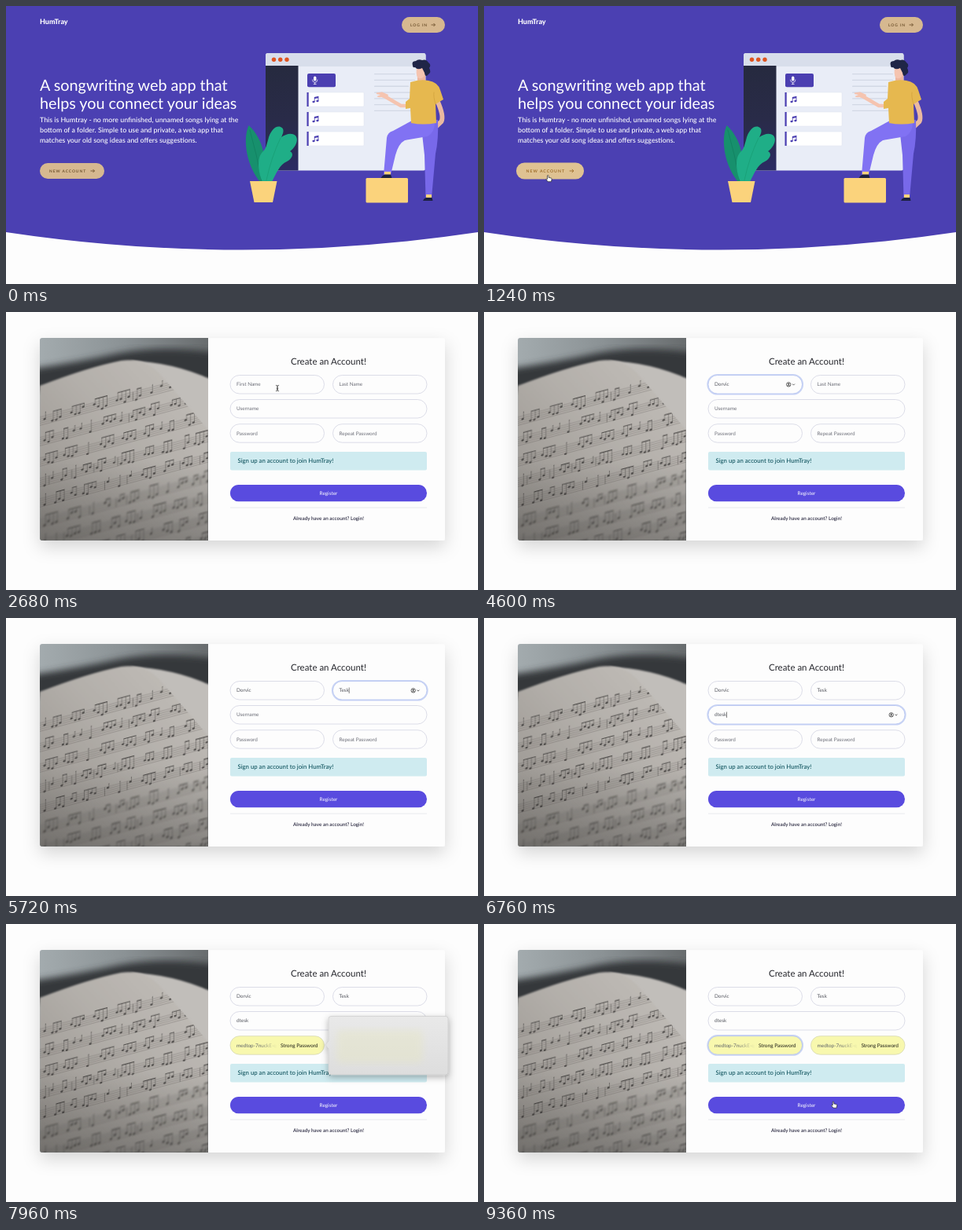
These frames come from a looping animation (600 px wide and 354 px high, 9400 ms). An HTML page:

```html
<!DOCTYPE html>
<html lang="en">
<head>
<meta charset="utf-8">
<title>Songwriting app sign-up</title>
<style>
  html, body { margin: 0; width: 100%; height: 100%; overflow: hidden; background: #fdfdfd; }
  svg { display: block; width: 100vw; height: 100vh; font-family: Lato, "Open Sans", sans-serif; text-rendering: geometricPrecision; }
</style>
</head>
<body>
<svg id="stage" viewBox="0 0 600 354"></svg>
<script>
const LOOP = 9400;
const PAGE_SWITCH = 2080;
const stage = document.getElementById('stage');
const $ = id => document.getElementById(id);

const clamp = v => Math.max(0, Math.min(1, v));
const ease = v => { v = clamp(v); return v * v * (3 - 2 * v); };
const mix = (a, b, k) => a + (b - a) * k;
const mixRgb = (a, b, k) => `rgb(${a.map((v, i) => Math.round(mix(v, b[i], k)))})`;
const show = (el, on) => el.setAttribute('display', on ? 'inline' : 'none');

const text = (x, y, size, str, extra = '') =>
  `<text x="${x}" y="${y}" font-size="${size}" ${extra}>${str}</text>`;
const rect = (x, y, w, h, fill, r = 0, extra = '') =>
  `<rect x="${x}" y="${y}" width="${w}" height="${h}" rx="${r}" fill="${fill}" ${extra}/>`;
const path = (d, fill, extra = '') => `<path d="${d}" fill="${fill}" ${extra}/>`;
const line = (d, stroke, width, extra = '') =>
  `<path d="${d}" fill="none" stroke="${stroke}" stroke-width="${width}" stroke-linecap="round" stroke-linejoin="round" ${extra}/>`;
const arrow = (x, y) =>
  `<path d="M${x - 2.5} ${y}h5m-2 -2l2 2l-2 2" fill="none" stroke="currentColor" stroke-width=".9"/>`;

// Seeded generator for the sheet music
let seed = 7;
const rand = () => (seed = (seed * 16807) % 2147483647) / 2147483647;

/* ---------- landing page ---------- */
function pill(id, x, y, w, h, label, labelX, arrowX) {
  return `<g id="${id}" color="#70542f">` + rect(x, y, w, h, '#d6b890', h / 2) +
    text(labelX, y + h / 2 + 1.8, 4.9, label, 'font-weight="700" letter-spacing=".95" fill="currentColor"') +
    arrow(arrowX, y + h / 2) + '</g>';
}

function songCard(y) {
  return rect(383, y, 72, 18, '#fff', 1, 'stroke="#dde2ee" stroke-width=".5"') +
    rect(382.5, y, 2.2, 18, '#4b3fb1') +
    `<g transform="translate(393 ${y + 9})" fill="#4b3fb1">` +
    '<ellipse cx="-2" cy="3" rx="1.6" ry="1.3"/><ellipse cx="2.9" cy="2" rx="1.6" ry="1.3"/>' +
    '<path d="M-1.2 3V-3L4.4 -4.2V2H3.5V-1.8L-.4 -1V3z"/></g>';
}

function browserArt() {
  let s = rect(330, 60, 203.5, 149.5, '#e9edf7', 3);
  s += path('M330 77V63q0 -3 3 -3h197.5q3 0 3 3V77z', '#d8deeb');
  for (const x of [340.5, 348.7, 357]) s += `<circle cx="${x}" cy="68.3" r="2.7" fill="#df5420"/>`;
  s += rect(330, 76, 41.5, 133.5, 'url(#side)');
  s += rect(383, 86, 36, 17.3, '#4b3fb1', 2);
  s += rect(391, 89.5, 3.4, 6, '#fff', 1.7) + line('M389.5 94q0 3.4 3.2 3.4t3.2 -3.4M392.7 97.5v2m-1.5 0h3', '#fff', .7);
  s += [110, 135, 160].map(songCard).join('');
  for (let i = 0; i < 7; i++) s += rect(468, 86 + i * 7.8, i % 3 === 2 ? 44 : 52, 1.3, '#d2d8e5', .6);
  return s;
}

function plantArt() {
  return path('M308.5 152C300 172 307 205 323 224L329 224C331 196 328 170 308.5 152z', '#17906d') +
    line('M310 158Q319 190 325 222', '#107a5b', .6) +
    path('M326 224C319 207 320 192 326 186C331 181 331 177 333 171C336 158 343 152 349 154C355 156 352 163 350 167C356 163 363 161 368 165C373 171 367 181 361 185C367 188 363 195 357 198C348 202 344 212 338 224z', '#1fae87') +
    line('M331 222Q337 193 349 168', '#17996f', .6) +
    path('M310 223H344.5L339 250H315.5z', '#fbd37c');
}

function personArt() {
  const skin = '#f5c4b0';
  return rect(457.5, 219, 53.5, 31.5, '#fbd37c', 1.5) +
    line('M548 120Q557 140 553.5 147L543 157', '#eab9a0', 6) +
    path('M527 145L549 145Q550 170 546 188L541 244H533.5L532 190z', '#7869ea') +
    path('M516 146H545Q546 160 536 166L507 171Q499 175 495 190L489 215H480L484 168Q485 161 492 159z', '#8172f3') +
    path('M534 240H541V244H534z', '#fbd37c') + path('M530 248Q531 245 534 244H541.5L542.5 248z', '#1c2140') +
    path('M481 211H489V215H481z', '#fbd37c') + path('M476.5 219Q478 216 481 214.5H489L490.5 219z', '#1c2140') +
    line('M515 127L502 127L483 116', skin, 4.6) +
    path('M486 113L478 109.5L471 110.5Q470 112 473 112.5L476 113L471.5 115Q473 117 477 116L484 118.5z', skin) +
    path('M523 84H533V97Q528 102 523 97z', '#eeb59f') +
    path('M514 97Q526 93 537 95Q549 97 552 107L556 119L546 125L547 149Q530 152 515 149L514 130L508 131L508 122L513 118z', '#e6b84f') +
    line('M546 125Q543 115 544 110', '#cf9f3b', .7) +
    path('M522 79Q521 87 523 91Q527 94 531 90L535 81L529 75z', skin) +
    path('M517 76Q515 70 521 70Q524 67 529 69Q534 67 537 72Q541 75 538 79Q541 84 537 87Q533 92 532 85Q530 81 529 79Q523 82 520 78Q517 79 517 76z', '#1f2547');
}

const landing = () => `<g id="landing">` +
  path('M0 0H600V288Q300 333 0 288z', '#4b40b2') +
  text(43, 23, 9, 'HumTray', 'fill="#fff" font-weight="800"') +
  pill('login', 503, 14, 55, 20, 'LOG IN', 514, 543) +
  `<g fill="#fff">` +
  text(43, 108.3, 19.8, 'A songwriting web app that') + text(43, 130.8, 19.8, 'helps you connect your ideas') +
  `<g font-weight="500">` +
  text(43, 148.2, 8.8, 'This is Humtray - no more unfinished, unnamed songs lying at the') +
  text(43, 160.9, 8.8, 'bottom of a folder. Simple to use and private, a web app that') +
  text(43, 173.5, 8.8, 'matches your old song ideas and offers suggestions.') + '</g></g>' +
  pill('join', 43, 200, 82, 20, 'NEW ACCOUNT', 55, 110) +
  browserArt() + plantArt() + personArt() + '</g>';

/* ---------- sign-up page ---------- */
function stave(y, blur) {
  let lines = '', heads = '', stems = '', beams = '';
  for (let k = 0; k < 5; k++) lines += `M0 ${k * 2.6}H220`;
  for (let x = 6; x < 215;) {
    const count = 1 + Math.floor(rand() * 4), top = -2 - rand() * 3, from = x;
    for (let k = 0; k < count; k++, x += 5) {
      const ny = 1 + rand() * 10;
      heads += `<ellipse cx="${x.toFixed(1)}" cy="${ny.toFixed(1)}" rx="1.6" ry="1.2"/>`;
      stems += `M${(x + 1.3).toFixed(1)} ${ny.toFixed(1)}V${top.toFixed(1)}`;
    }
    beams += `M${from + 1.3} ${top}H${x - 3.7}`;
    x += 3 + rand() * 9;
    if (rand() < .3) stems += `M${x - 4} 0V10.4`;
  }
  return `<g transform="translate(43 ${y}) skewY(-15)" opacity=".75" filter="url(#${blur})">` +
    line(lines, '#5c5854', .4) + line(stems, '#33302f', .5) + line(beams, '#2b2928', 1.1) +
    `<g fill="#2b2928">${heads}</g></g>`;
}

function photo() {
  const page = 'M43 94Q105 70 146 62Q176 58 195 78L257 150V291H43z';
  let s = '<clipPath id="frame"><path d="M257 33V291H46q-3 0 -3 -3V36q0 -3 3 -3z"/></clipPath>' +
    `<clipPath id="sheet"><path d="${page}"/></clipPath><g clip-path="url(#frame)">` +
    rect(43, 33, 214, 258, 'url(#wall)') +
    path('M35 72Q90 64 145 52Q200 42 270 52V100H35z', '#35383a', 'filter="url(#soft)"') +
    path('M158 62Q215 64 265 88V170L190 78z', '#c1beba', 'filter="url(#hazy)"') +
    path(page, 'url(#paper)', 'filter="url(#hazy)"') + '<g clip-path="url(#sheet)">';
  for (let i = 0; i < 9; i++) s += stave(134 + i * 26, i < 5 ? 'sharp' : 'hazy');
  return s + '</g>' + rect(43, 33, 214, 258, 'url(#dim)') + '</g>';
}

const fields = [
  { x: 285, y: 80.5, w: 119.5, hint: 'First Name', value: 'Dorvic', focus: [[3040, 4840]], start: 3250, step: 150 },
  { x: 415.5, y: 80.5, w: 119.5, hint: 'Last Name', value: 'Tesk', focus: [[4840, 5760]], start: 5080, step: 130 },
  { x: 285, y: 111.5, w: 250, hint: 'Username', value: 'dtesk', focus: [[5760, 6840]], start: 6080, step: 130 },
  { x: 285, y: 142.7, w: 119.5, hint: 'Password', value: '', focus: [[6840, 7080], [8120, LOOP]], filled: 7120 },
  { x: 415.5, y: 142.7, w: 119.5, hint: 'Repeat Password', value: '', focus: [], filled: 7120 }
];

function fieldSvg(f, i) {
  const { x, y, w } = f, ix = x + w - 17.3, cy = y + 11.8;
  let s = rect(x, y, w, 23.5, 'none', 11.75, `id="ring${i}" stroke="#c9d4f5" stroke-width="3.2"`) +
    rect(x, y, w, 23.5, '#fdfdfd', 11.75, `id="box${i}" stroke="#d3d5e2" stroke-width=".8"`) +
    text(x + 8, y + 13.9, 6.4, f.hint, `id="txt${i}"`) +
    `<path id="caret${i}" stroke="#333" stroke-width=".6"/>` +
    `<g id="icon${i}" fill="none" stroke="#222" stroke-width=".7"><circle cx="${ix}" cy="${cy}" r="2.7"/>` +
    `<circle cx="${ix}" cy="${cy - .7}" r=".7" fill="#222"/><path d="M${ix - 1.6} ${cy + 1.7}q1.6 -1.6 3.2 0M${ix + 4.8} ${cy - .7}l1.5 1.5l1.5 -1.5"/></g>`;
  if (f.filled) {
    s += `<g id="auto${i}">` +
      `<linearGradient id="fade${i}" gradientUnits="userSpaceOnUse" x1="${x + 36}" x2="${x + 60}">` +
      '<stop stop-color="#5c6066"/><stop offset="1" stop-color="#5c6066" stop-opacity="0"/></linearGradient>' +
      text(x + 8, y + 13.9, 6.4, 'medtop-7nuckE-q', `fill="url(#fade${i})"`) +
      text(x + w - 8, y + 13.9, 6.5, 'Strong Password', 'fill="#1b1b14" text-anchor="end"') + '</g>';
  }
  return s;
}

const signup = () => `<g id="signup">` +
  rect(43, 33.5, 515, 257.5, '#fdfdfd', 3, 'filter="url(#lift)"') + photo() +
  text(410, 66.5, 11.5, 'Create an Account!', 'text-anchor="middle" fill="#25262c"') +
  fields.map(fieldSvg).join('') +
  rect(285, 178, 250, 23.5, '#cfebf0', 2) +
  text(294.5, 192.2, 7.75, 'Sign up an account to join HumTray!', 'fill="#0f535d" font-weight="500"') +
  rect(285, 220, 250, 21.3, '#594bdf', 10.6) +
  text(410, 232.6, 6.4, 'Register', 'text-anchor="middle" fill="#fff"') +
  rect(285, 248.7, 250, .7, '#dfe0e6') +
  text(410, 265.1, 6.4, 'Already have an account? Login!', 'text-anchor="middle" fill="#1c1b34" font-weight="500"') +
  `<g id="popup">` +
  path('M413 117.5H559q3 0 3 3V189q0 3 -3 3H413q-3 0 -3 -3V159l-4.5 -5l4.5 -5V120.5q0 -3 3 -3z', 'url(#pane)', 'stroke="#bcbcbc" stroke-width=".5" filter="url(#popLift)"') +
  rect(420, 135, 110, 42, '#e6e6c0', 6, 'opacity=".4" filter="url(#soft)"') + '</g></g>';

const stops = list => list.map(([o, c, a = 1]) => `<stop offset="${o}" stop-color="${c}" stop-opacity="${a}"/>`).join('');
const grad = (id, dir, ...list) => `<linearGradient id="${id}" ${dir}>${stops(list)}</linearGradient>`;
const blur = (id, size) => `<filter id="${id}"><feGaussianBlur stdDeviation="${size}"/></filter>`;
const shadow = (id, dy, size, alpha) =>
  `<filter id="${id}" x="-20%" y="-30%" width="140%" height="170%"><feDropShadow dx="0" dy="${dy}" stdDeviation="${size}" flood-opacity="${alpha}"/></filter>`;
const down = 'x1="0" y1="0" x2="0" y2="1"';
const across = 'x1="0" y1="0" x2="1" y2="0"';
const diag = 'x1="1" y1="0" x2="0" y2="1"';

const cursors =
  `<g id="cursor"><g id="hand">` +
  path('M-2 -3.6q.9 -1 1.6 .2v2.3l3 .6q1.2 .3 1 1.5l-.6 3.2h-4.2l-2.4 -3q.1 -1.2 1.6 -.2z', '#fff', 'stroke="#222" stroke-width=".7"') +
  '</g><g id="beam">' + line('M-1.7 -3.7q1.7 0 1.7 1v5.4q0 1 -1.7 1M1.7 -3.7q-1.7 0 -1.7 1v5.4q0 1 1.7 1M-.8 .9h1.6', '#333', .7) +
  '</g><g id="pointer">' + path('M-2 -4V4L0 2.3L1.3 5L2.5 4.5L1.3 1.8H3.7z', '#222', 'stroke="#fff" stroke-width=".6"') + '</g></g>';

stage.innerHTML = '<defs>' +
  grad('side', down, [0, '#262a3f'], [.5, '#292b48'], [1, '#2b2b63']) +
  grad('wall', across, [0, '#a3abae'], [.5, '#8b9295'], [1, '#686c6e']) +
  grad('paper', diag, [0, '#c4c0bb'], [.45, '#b3afaa'], [1, '#94908b']) +
  grad('dim', down, [0, '#222', 0], [.6, '#222', 0], [1, '#222', .3]) +
  grad('pane', down, [0, '#e9e9e9'], [1, '#dddddd']) +
  shadow('lift', 8, 11, .16) + shadow('popLift', 3, 4, .3) +
  blur('soft', 4) + blur('hazy', 1.2) + blur('sharp', .35) + '</defs>' +
  rect(0, 0, 600, 354, '#fdfdfd') + landing() + signup() + cursors;

/* ---------- motion ---------- */
const track = [[250, 6, 298], [880, 82.5, 219.5], [2150, 82.5, 219.5], [2640, 345, 97], [8300, 345, 97], [8920, 445.2, 230]];

function cursorAt(t) {
  let i = 0;
  while (i < track.length - 2 && t > track[i + 1][0]) i++;
  const [t0, x0, y0] = track[i], [t1, x1, y1] = track[i + 1], k = ease((t - t0) / (t1 - t0));
  return [mix(x0, x1, k), mix(y0, y1, k)];
}

const inside = (x, y, bx, by, w, h) => x > bx && x < bx + w && y > by && y < by + h;

function drawCursor(t) {
  const [x, y] = cursorAt(t);
  const home = t < PAGE_SWITCH;
  const onButton = home ? inside(x, y, 42, 199, 84, 22) : inside(x, y, 285, 220, 250, 21);
  const onField = !home && fields.some(f => inside(x, y, f.x, f.y, f.w, 23.5));
  show($('cursor'), t > 250 && (t < 3250 || t > 8300));
  $('cursor').setAttribute('transform', `translate(${x} ${y})`);
  show($('hand'), onButton);
  show($('beam'), onField);
  show($('pointer'), !onButton && !onField);
}

function drawJoin(t) {
  const k = ease((t - 780) / 200), s = 1 + .05 * k, g = $('join');
  g.setAttribute('transform', `translate(84 210) scale(${s}) translate(-84 -210)`);
  g.setAttribute('color', mixRgb([112, 84, 47], [158, 110, 44], k));
  g.firstChild.setAttribute('fill', mixRgb([214, 184, 144], [223, 194, 146], k));
}

function drawField(f, i, t) {
  const focused = f.focus.some(([a, b]) => t >= a && t < b);
  const filled = f.filled && t >= f.filled;
  const typed = f.value ? Math.max(0, Math.min(f.value.length, Math.floor((t - f.start) / f.step) + 1)) : 0;
  const label = $('txt' + i), box = $('box' + i), caret = $('caret' + i);
  label.textContent = typed ? f.value.slice(0, typed) : f.hint;
  label.setAttribute('fill', typed ? '#55575f' : '#6c6e78');
  show(label, !filled);
  show($('ring' + i), focused);
  show($('icon' + i), focused && !filled);
  box.setAttribute('fill', filled ? '#f8f8ae' : '#fdfdfd');
  box.setAttribute('stroke', focused ? '#b4c3f0' : filled ? '#d6d8b4' : '#d3d5e2');
  if (f.filled) show($('auto' + i), filled);

  const lastKey = typed ? f.start + (typed - 1) * f.step : f.focus.length ? f.focus[0][0] : 0;
  const caretOn = focused && !filled && (t - lastKey) % 1000 < 500;
  show(caret, caretOn);
  if (caretOn) {
    const cx = f.x + 8.3 + (typed ? label.getComputedTextLength() : 0);
    caret.setAttribute('d', `M${cx} ${f.y + 8}v7.5`);
  }
}

function drawPopup(t) {
  const grow = mix(.85, 1, ease((t - 7080) / 160));
  const alpha = clamp((t - 7080) / 120) * (1 - clamp((t - 8000) / 160));
  show($('popup'), alpha > 0);
  $('popup').setAttribute('opacity', alpha);
  $('popup').setAttribute('transform', `translate(406 154) scale(${grow}) translate(-406 -154)`);
}

function draw(t) {
  const home = t < PAGE_SWITCH;
  show($('landing'), home);
  show($('signup'), !home);
  if (home) drawJoin(t);
  else {
    fields.forEach((f, i) => drawField(f, i, t));
    drawPopup(t);
  }
  drawCursor(t);
}

const began = performance.now();
function tick() {
  draw((performance.now() - began) % LOOP);
  requestAnimationFrame(tick);
}
tick();
</script>
</body>
</html>
```
